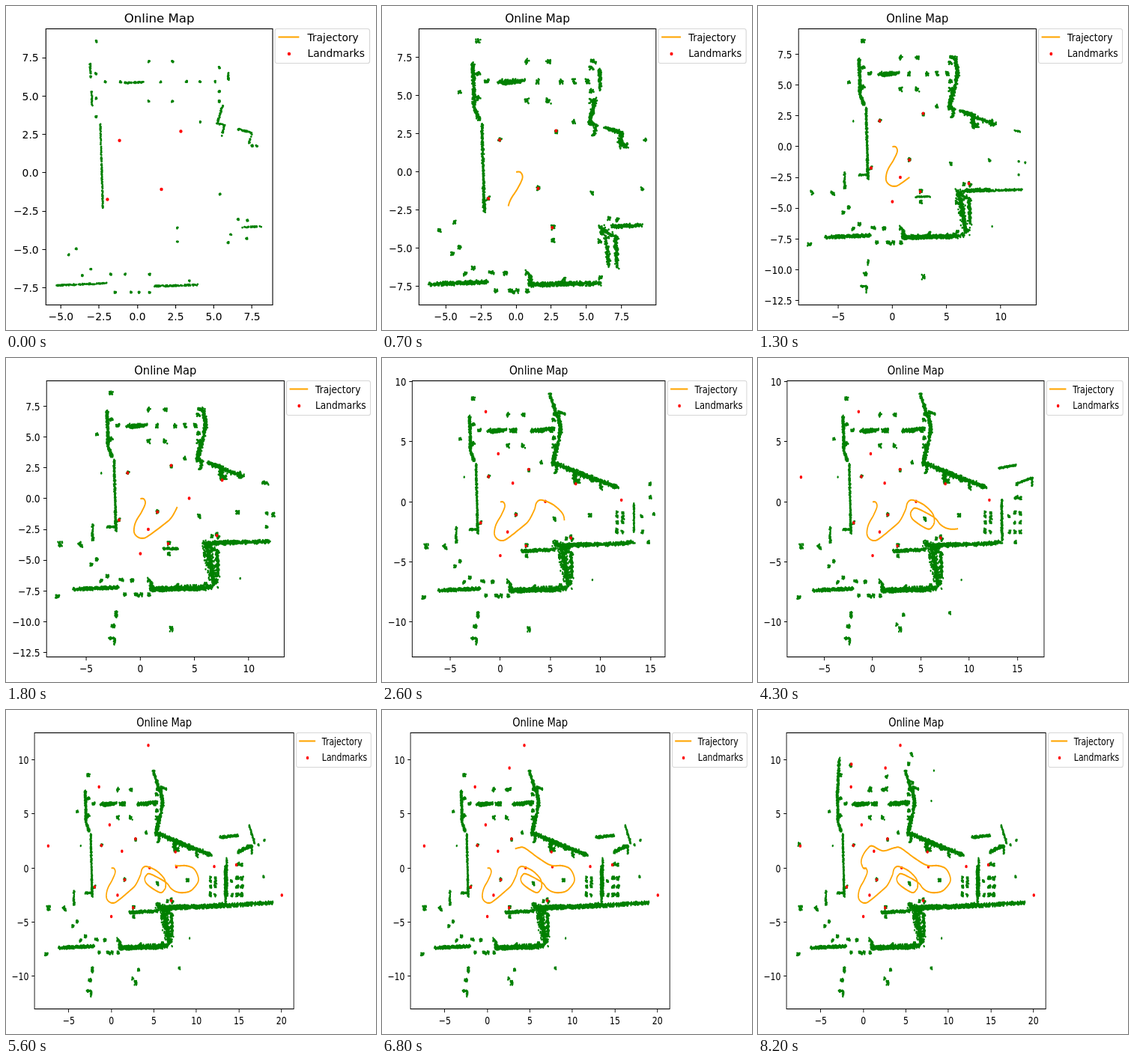
An HTML page that plays this animation: 494x433 px, repeating every 8300 ms.

```html
<!DOCTYPE html>
<html lang="en">
<head>
<meta charset="utf-8">
<title>Online Map</title>
<style>
html, body { margin: 0; width: 100%; height: 100%; overflow: hidden; background: #fff; }
svg { display: block; width: 494px; height: 433px; font: 13.89px "DejaVu Sans", sans-serif; }
.line { fill: none; stroke: #000; stroke-width: 1.11; }
.dots { fill: none; stroke-linecap: round; }
.green { stroke: #008000; stroke-width: 2.8; }
.red { stroke: #f00; stroke-width: 4.4; }
.path { fill: none; stroke: #ffa500; stroke-width: 2.08; stroke-linejoin: round; }
.title { font-size: 16.67px; text-anchor: middle; }
.xl { text-anchor: middle; }
.yl { text-anchor: end; }
</style>
</head>
<body>
<svg id="fig" preserveAspectRatio="none">
  <clipPath id="clip"><rect id="clipBox"/></clipPath>
  <g clip-path="url(#clip)">
    <path id="walls" class="dots green"/>
    <path id="marks" class="dots red"/>
    <path id="track" class="path"/>
  </g>
  <path id="ticks" class="line"/>
  <rect id="frame" class="line"/>
  <g id="labels"></g>
  <text id="title" class="title" y="22">Online Map</text>
  <g id="legend">
    <rect x="0" y="30.5" width="127" height="46" rx="2.8" fill="#fff" stroke="#d6d6d6" stroke-width="1.2"/>
    <path class="path" d="M4.5 41.5h28"/>
    <path class="dots red" d="M19 64h0"/>
    <text x="43.6" y="47">Trajectory</text>
    <text x="43.6" y="67.7">Landmarks</text>
  </g>
</svg>
<script>
const $ = id => document.getElementById(id);
const LOOP = 8300, STEP = 100, TOP = 30.5, H = 369, FONT = 13.89, GROW = 450;

let seed = 7;
const rnd = () => {
  seed = (seed + 0x6D2B79F5) | 0;
  let a = Math.imul(seed ^ seed >>> 15, 1 | seed);
  a = a + Math.imul(a ^ a >>> 7, 61 | a) ^ a;
  return ((a ^ a >>> 14) >>> 0) / 4294967296;
};

const points = [], marks = [], corners = [];

// Scan hits along a line: 40% at once, the rest while it thickens
function strip(t, w, x1, y1, x2, y2, base = 0) {
  const n = base + Math.ceil(Math.hypot(x2 - x1, y2 - y1) * (40 + 90 * w));
  corners.push({ t, x: x1, y: y1 }, { t, x: x2, y: y2 });
  for (let k = 0; k < n; k++) {
    const age = Math.max(0, rnd() * 1.67 - .67), f = rnd();
    const spread = w * Math.min(1, .3 + age * 1.5);
    points.push({
      t: t + age * GROW,
      x: x1 + (x2 - x1) * f + spread * (rnd() - .5),
      y: y1 + (y2 - y1) * f + spread * (rnd() - .5)
    });
  }
}
function wall(t, w, ...xy) {
  for (let i = 0; i + 3 < xy.length; i += 2) strip(t, w, ...xy.slice(i, i + 4));
}
function spots(t, w, ...xy) {
  for (let i = 0; i < xy.length; i += 2) strip(t, w, xy[i], xy[i + 1], xy[i], xy[i + 1], 22);
}
function grid(t, w, xs, ys) {
  for (const x of xs) for (const y of ys) spots(t, w, x, y);
}
function rubble(t, n, x, y, dx, dy) {
  while (n--) spots(t, .3, x + dx * rnd(), y + dy * rnd());
}
function landmarks(t, gap, ...xy) {
  for (let i = 0; i < xy.length; i += 2) marks.push({ t: t + gap * i / 2, x: xy[i], y: xy[i + 1] });
}

// First sweep
wall(0, .25, -3.1, 7.1, -3.05, 6.2);
wall(0, .22, -3, 5.35, -2.95, 4.2);
wall(0, .18, -2.42, 3.15, -2.26, -2.3);
wall(0, .3, -.9, 5.85, .35, 5.9);
wall(0, .25, 5.93, 6.55, 5.95, 6.05);
wall(0, .28, 5.58, 4.4, 5.22, 3.2, 5.7, 3.1, 5.5, 2.4);
wall(0, .25, 6.57, 2.84, 7.5, 2.6, 7.3, 1.9);
wall(0, .22, 6.8, -3.55, 8.15, -3.5);
wall(0, .26, -5.31, -7.35, -2, -7.2);
wall(0, .32, 1.1, -7.4, 4.1, -7.3);
grid(0, .36, [.75, 2.3], [7.25, 4.65]);
grid(0, .36, [-2.7], [8.56, 6.45, 4.85, 3.65]);
grid(0, .34, [-2.1, -1.1, 1.5, 3.2, 4.1, 5.1], [5.93]);
grid(0, .34, [5.35], [6.85, 5.3, 4.65]);
grid(0, .34, [7.5, 7.8], [1.75]);
grid(0, .25, [2.62], [-3.6, -4.5]);
grid(0, .36, [-1.75, -.8, .8], [-6.62]);
grid(0, .3, [-1.45, -.4, .1, .8], [-7.8]);
spots(0, .25, -4, -4.95, -4.5, -5.35, -3.05, -6.3, -3.6, -6.7, 4.1, 3.3, 5.4, -1.4, 3.4, -7.05);
rubble(0, 5, 5.8, -4.8, 1.4, 1.8);
landmarks(0, 0, -1.17, 2.1, 2.84, 2.7, 1.57, -1.08, -1.96, -1.74);

// Room outline
wall(150, .26, -3.05, 7.1, -2.98, 4.3, -2.6, 3.4);
wall(150, .2, -2.3, -1, -2.26, -2.65);
wall(150, .32, -1.2, 5.85, .6, 6);
wall(150, .28, -6.13, -7.35, -2, -7.25);
wall(200, .25, 5.3, 7.35, 5.7, 7.15);
wall(200, .25, 5.95, 6.7, 5.95, 5.4);
wall(200, .3, 5.6, 4.8, 5.25, 3.3);
wall(200, .28, 6.3, 2.9, 7.55, 2.5, 7.4, 1.6);
wall(250, .24, 6.8, -3.6, 8.9, -3.5);
wall(250, .5, 5.9, -3.6, 6.8, -4.2);
wall(250, .3, 6.35, -4.2, 6.6, -6.2);
wall(250, .3, 7.05, -4.2, 7.2, -6.3);
wall(250, .32, 1, -6.8, 1, -7.4, 6, -7.3);
spots(200, .3, -1.15, 2.1, 2.88, 2.67, 1.6, -1.05, -2, -1.75, 2.65, -3.65, -.15, -7.9);
spots(250, .22, 9.17, 2.1, 8.95, -1.1, 6, -6.95, -4, 5.25, -4.35, -3.3, -5.45, -3.85);
landmarks(400, 0, 2.57, -3.66);

// South and east
wall(900, .35, 5.8, 7.3, 6.05, 6, 5.3, 3.1);
wall(1000, .35, 6.2, 2.9, 9.4, 1.8);
wall(1000, .18, -4.4, -2.1, -4.4, -3.3);
wall(1000, .15, -3.1, -2.3, -2.3, -2.3);
wall(1100, .9, 6.15, -3.8, 6.8, -7);
wall(1100, .45, 1, -7.35, 6.6, -7.2);
wall(1100, .2, -2.9, -11.35, -2.4, -11.35, -2.4, -11.85);
wall(1100, .25, -2.2, -9.1, -2.25, -9.6);
wall(1200, .33, 6.2, -3.65, 11.9, -3.5);
wall(1200, .2, 2.1, -4.1, 3.5, -4.05);
wall(1200, .3, 7.5, 2.4, 7.5, 1.5);
wall(1300, .25, 11.2, 1.35, 11.75, 1.2);
spots(1000, .4, -7.4, -3.7, -5.6, -3.7, -7.65, -8, -2.5, -10.4, 2.9, -10.6);
spots(1300, .3, 12.24, -1.3, 8.95, -1.1, 7.05, -2.9, 5.4, -1.45);
grid(1300, .22, [11.65], [-1.2, -2.3]);
spots(1300, .02, -3.6, 2.05, 9.2, -6.5);
landmarks(1000, 150, 0, -4.47, .73, -2.5, 7.05, -3, 4.5, .03, 7.54, 1.5);

// Gallery
wall(1950, .32, 4.95, 9.02, 6.08, 6.05);
wall(1950, .16, 5.8, 7.5, 6.5, 7.3);
wall(1950, .35, 3.1, 5.9, 5.4, 6.1);
wall(1950, .3, 1, 5.9, 1.6, 6);
wall(2050, .35, 5.4, 3.2, 11.7, 1.2);
wall(2050, .3, 10, 1.6, 10.1, 1.1);
wall(2050, .35, 11.8, -3.5, 13.3, -3.35);
wall(2050, .28, 2.2, -4.1, 5.5, -3.95);
wall(2050, .5, 5.4, -3.45, 6.8, -3.8);
grid(2100, .25, [11.65, 12.2], [-.9, -1.7, -2.5]);
spots(2100, .25, 14.95, 1.5, 15, .4, 15.3, -1, 14.15, -1.2, 14.2, -2.5, 14.8, -3.35);
wall(2100, .12, 13.35, -.1, 13.35, -2.5);
landmarks(2000, 100, 1.25, 1.56, -.2, 4, -1.45, 7.5, 12.1, .15);

// Far hall
wall(3750, .18, 13.1, 2.8, 14.85, 3.05);
wall(3750, .15, 14.9, 1.5, 16.55, 2, 16.5, 1.3);
wall(3750, .16, 13.4, .2, 13.45, -3.2);
grid(3750, .25, [14.75, 15.3], [.3, -.9, -1.7, -2.5]);
spots(3800, .22, 3.2, -9.4, 8, -9.25, 2.5, -10.2);
landmarks(3900, 0, -7.42, 2.05);

// East end
wall(4500, .24, 12.7, 2.85, 14.9, 3);
wall(4500, .35, 14.9, 1.5, 16.5, 2.1);
wall(4600, .2, 13.55, .9, 13.6, -2.6);
wall(4700, .35, 6, -3.75, 13, -3.5, 18.95, -3.2);
wall(4900, .18, 16.2, 4, 16.85, 2.3);
grid(4900, .28, [14.9, 15.4], [-.9, -1.7, -2.4]);
spots(5000, .15, 17.3, 2.15, 18, 2.55, 17.9, -.8);
landmarks(4600, 200, 7.65, .13, 14.7, .3, 4.35, 11.34, 20.05, -2.5);

// Way back
wall(6900, .3, -2.85, 10.1, -3, 7);
wall(6600, .35, -.9, 5.85, .7, 5.95);
wall(6600, .35, 3, 5.9, 5.3, 6.1);
grid(6600, .45, [.75, 2.7], [7.3]);
spots(7000, .35, 5.7, 10.5, 5.3, 9.6, 5.8, 7.9, 2.7, 8.4, -1.5, 9.5, -7.5, 2.2);
spots(7000, .02, 8, 6.2, 8.3, 9);
landmarks(6800, 300, 2.6, 9.25, -1.4, 9.6);

// Robot route: a smooth curve through key points, even speed on each leg
const track = [{ t: 0, x: 0, y: 0 }];
const spline = (a, b, c, d, u) =>
  b + .5 * u * (c - a + u * (2 * a - 5 * b + 4 * c - d + u * (3 * (b - c) + d - a)));
const way = [[0, 0]], legs = [];
function drive(arrival, ...xy) {
  for (let i = 0; i < xy.length; i += 2) way.push([xy[i], xy[i + 1]]);
  legs.push({ arrival, last: way.length - 1 });
}
drive(700, .32, -.03, .45, -.4, .1, -1.1, -.35, -1.75, -.55, -2.25);
drive(1800, -.57, -2.75, -.3, -3.08, .14, -3.22, .7, -3.05, 2.2, -2.07, 2.85, -1.55, 3.4, -.67);
drive(2600, 3.6, -.1, 3.97, .15, 4.57, .05, 5.4, -.3, 6.2, -.95, 6.4, -1.55);
drive(4300, 6.25, -1.98, 5.7, -2.25, 4.33, -1.58, 3.94, -1.08, 4.1, -.68, 4.6, -.55, 6.35, -1.28, 7.05, -1.9, 7.83, -2.23, 8.85, -2.23);
drive(5600, 9.6, -1.92, 10.25, -1.1, 9.78, -.12, 8.8, .22, 7.48, .26);
drive(8200, 6.07, .9, 4.4, 1.85, 3.68, 1.88, 2.3, 1.6, 1.03, 2.05, .5, 1.8, 0, 1.25, -.25, .6, 0, 0, .4, 0);

let first = 0, start = 0;
for (const { arrival, last } of legs) {
  const run = [];
  let prev = track[track.length - 1], dist = 0;
  for (let i = first; i < last; i++) {
    const q = [i - 1, i, i + 1, i + 2].map(k => way[Math.min(way.length - 1, Math.max(0, k))]);
    for (let k = 1; k <= 12; k++) {
      const [x, y] = [0, 1].map(c => spline(...q.map(p => p[c]), k / 12));
      dist += Math.hypot(x - prev.x, y - prev.y);
      run.push(prev = { x, y, dist });
    }
  }
  for (const p of run) track.push({ x: p.x, y: p.y, t: start + (arrival - start) * p.dist / dist - .01 });
  first = last;
  start = arrival;
}

// Axis limits: extent of everything seen, plus 5% on each side
function limits(seen, axis) {
  const v = seen.map(p => p[axis]), lo = Math.min(...v), hi = Math.max(...v), pad = .05 * (hi - lo);
  return [lo - pad, hi + pad];
}

function tickList(lo, hi, bins) {
  const step = (hi - lo) / bins <= 2.5 ? 2.5 : 5, list = [];
  for (let v = Math.ceil(lo / step) * step; v <= hi; v += step)
    list.push({ v, text: (v < 0 ? '\u2212' : '') + Math.abs(v).toFixed(step < 5 ? 1 : 0) });
  return list;
}

const textWidth = s => FONT * [...s].reduce((w, c) => w + (c === '.' ? .318 : c === '\u2212' ? .838 : .636), 0);
const snap = v => Math.floor(v) + .5;
const setBox = (el, x, y, width, height) =>
  Object.entries({ x, y, width, height }).forEach(([k, v]) => el.setAttribute(k, v));

function draw(t) {
  const now = list => list.filter(p => p.t <= t);
  const seen = [...now(corners), ...now(marks)];
  const [x0, x1] = limits(seen, 'x'), [y0, y1] = limits(seen, 'y');
  const scale = H / (y1 - y0), W = Math.round(scale * (x1 - x0)), bottom = TOP + H;
  const xs = tickList(x0, x1, Math.min(9, Math.floor(W * .72 / 30)));
  const ys = tickList(y0, y1, 9);
  const L = snap(19.4 + Math.max(...ys.map(k => textWidth(k.text))));
  const X = x => (L + (x - x0) * scale).toFixed(2);
  const Y = y => (bottom - (y - y0) * scale).toFixed(2);
  const dots = list => now(list).map(p => `M${X(p.x)} ${Y(p.y)}h0`).join('');

  // The whole figure is squeezed to the stage width
  $('fig').setAttribute('viewBox', `0 0 ${L + W * 1.01 + 135.5} 433`);
  setBox($('frame'), L, TOP, W, H);
  setBox($('clipBox'), L, TOP, W, H);
  $('title').setAttribute('x', L + W / 2);
  $('legend').setAttribute('transform', `translate(${L + W * 1.01})`);

  $('ticks').setAttribute('d',
    xs.map(k => `M${snap(X(k.v))} ${bottom}v4.86`).join('') +
    ys.map(k => `M${L} ${snap(Y(k.v))}h-4.86`).join(''));
  $('labels').innerHTML =
    xs.map(k => `<text class="xl" x="${X(k.v)}" y="420.3">${k.text}</text>`).join('') +
    ys.map(k => `<text class="yl" x="${L - 9.7}" y="${+Y(k.v) + 5.3}">${k.text}</text>`).join('');

  $('walls').setAttribute('d', dots(points));
  $('marks').setAttribute('d', dots(marks));
  $('track').setAttribute('d', 'M' + now(track).map(p => `${X(p.x)} ${Y(p.y)}`).join('L'));
}

let shown = -1;
function tick() {
  const t = Math.floor(performance.now() % LOOP / STEP) * STEP;
  if (t !== shown) draw(shown = t);
  requestAnimationFrame(tick);
}
tick();
</script>
</body>
</html>
```
